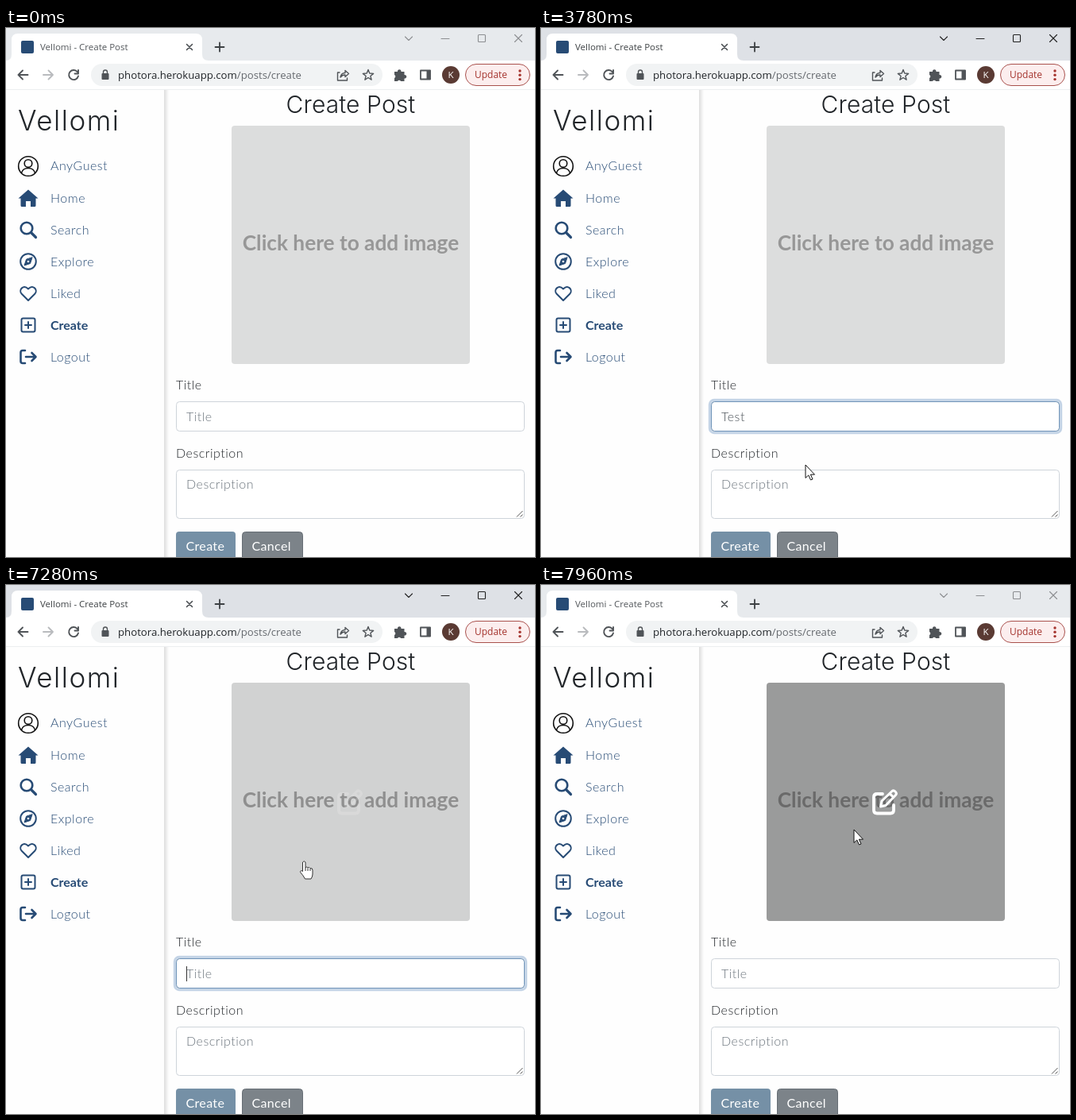
Recreate the animation shown at these times as an HTML page. Size 666 px wide and 666 px high, loop 8 s.

```html
<!DOCTYPE html>
<html lang="en">
<head>
<meta charset="utf-8">
<title>Create Post</title>
<style>
  html, body { margin: 0; width: 100%; height: 100%; overflow: hidden; background: #fefefe; }
  svg { display: block; width: 666px; height: 666px; }
  text { font: 300 16px Lato, sans-serif; letter-spacing: .5px; fill: #212529; white-space: pre; }
  .chrome text { font-family: "Open Sans", "Noto Sans", sans-serif; font-weight: 400; letter-spacing: 0; }
  text.brand { font-family: Inter, sans-serif; letter-spacing: .1px; }
  .nav text { fill: #274b75; }
  text.bold { font-weight: 700; letter-spacing: 0; }
  text.button { font-weight: 400; letter-spacing: .35px; fill: #fff; }
  text.hint { fill: #6c757d; }
  .line { fill: none; stroke-linecap: round; stroke-linejoin: round; }
</style>
</head>
<body>
<svg viewBox="0 0 666 666" xmlns="http://www.w3.org/2000/svg">
  <defs>
    <linearGradient id="shade">
      <stop offset="0" stop-color="#000" stop-opacity=".13"/>
      <stop offset="1" stop-color="#000" stop-opacity="0"/>
    </linearGradient>
  </defs>
  <rect width="666" height="666" fill="#fefefe"/>

  <g class="chrome">
    <rect id="strip" width="666" height="41"/>
    <path d="M0 41Q7 41 7 33V15Q7 7 15 7H239Q247 7 247 15V33Q247 41 255 41V78H0Z" fill="#fff"/>
    <rect y="41" width="666" height="37" fill="#fff"/>
    <rect y="77" width="666" height="1" fill="#eceef0"/>
    <rect x="19" y="16" width="16" height="16" rx="2" fill="#274b75"/>
    <text id="tabTitle" x="43" y="28" style="font-size:11.5px">Vellomi - Create Post</text>
    <path class="line" d="M227.500 20.500l7 7m0-7l-7 7" stroke="#45494d" stroke-width="1.500"/>
    <path class="line" d="M263.500 24H274.500M269 18.500V29.500" stroke="#3c4043" stroke-width="1.800"/>
    <g id="controls" class="line" stroke-width="1.100">
      <path d="M502.500 11l4.500 4.500l4.500-4.500M548 13.500H558M640.500 8.500l9 9m0-9l-9 9"/>
      <rect x="594.500" y="8.500" width="9" height="9" rx="1"/>
    </g>

    <g class="line" stroke="#505458" stroke-width="1.900">
      <path d="M27.500 59H15.500M21 53.500L15.500 59L21 64.500"/>
      <path d="M47 59H59M53.500 53.500L59 59L53.500 64.500" stroke="#b9bbbe"/>
      <path d="M90 55.500A6 6 0 1 0 91 60.500M91 53V57.500H86.500"/>
    </g>
    <rect x="107" y="45" width="367" height="28" rx="14" fill="#f1f3f4"/>
    <rect x="120.500" y="57" width="9" height="8" rx="1" fill="#505458"/>
    <path d="M122.500 57V55.500a2.500 2.500 0 0 1 5 0V57" fill="none" stroke="#505458" stroke-width="1.400"/>
    <text x="141" y="64" style="font-size:13.200px">photora.herokuapp.com<tspan fill="#666a6f">/posts/create</tspan></text>
    <g class="line" stroke="#505458" stroke-width="1.400">
      <path d="M420 56H417.500V66H429.500V63M421 62Q422 56.500 427 56.500V53.500L431.500 57.500L427 61.500V59Q423 59 421 62Z"/>
      <path id="star"/>
      <path d="M522 53.500H534V64.500H522Z" stroke-width="1.800"/>
    </g>
    <rect x="529.500" y="53" width="5" height="12" fill="#505458"/>
    <path d="M489 55h4a2.300 2.300 0 1 1 4.500 0h4v4a2.300 2.300 0 1 1 0 4.500V67h-4.500a2.200 2.200 0 0 0-4 0H489v-4a2.200 2.200 0 0 0 0-4Z" fill="#505458"/>
    <circle cx="560" cy="59" r="11" fill="#5a3a33"/>
    <text x="560" y="63.200" text-anchor="middle" style="font-size:11.500px;fill:#fff">K</text>
    <rect x="578.500" y="45.500" width="81" height="27" rx="13.500" fill="#fceeee" stroke="#a9514d"/>
    <text x="590" y="63" style="font-size:12px;fill:#a5352f">Update</text>
    <g fill="#a5352f"><circle cx="647" cy="54" r="1.700"/><circle cx="647" cy="59.300" r="1.700"/><circle cx="647" cy="64.600" r="1.700"/></g>
  </g>

  <rect x="199" y="78" width="6" height="588" fill="url(#shade)"/>
  <text class="brand" x="15" y="129" style="font-size:35px;letter-spacing:1.500px">Vellomi</text>
  <g class="nav" id="nav"></g>
  <g class="line" stroke="#111" stroke-width="1.600">
    <circle cx="28" cy="174" r="12.300"/>
    <circle cx="28" cy="170.500" r="4.800"/>
    <path d="M19.500 182.500Q21 176.500 28 176.500T36.500 182.500"/>
  </g>
  <path d="M28 203.500L40.500 214.500H37.500V223.500Q37.500 225 36 225H31V218H25V225H20Q18.500 225 18.500 223.500V214.500H15.500Z" fill="#274b75"/>
  <g class="line" stroke="#274b75" stroke-width="2">
    <path d="M31.500 257.500L37.500 263.500" stroke-width="3.200"/>
    <circle cx="26" cy="252" r="7.300" stroke-width="2.600"/>
    <circle cx="28" cy="294" r="9.800"/>
    <path d="M33 289L30.500 296.500L23 299L25.500 291.500Z" fill="#274b75" stroke-width="1"/>
    <circle cx="28" cy="294" r="1.300" fill="#fff" stroke="none"/>
    <path d="M28 343L19.500 334.500C15.500 329.500 22 322.500 28 328.500C34 322.500 40.500 329.500 36.500 334.500Z"/>
    <rect x="19.500" y="365.500" width="17" height="17" rx="2"/>
    <path d="M28 370V378M24 374H32"/>
    <path d="M24 406H21Q18.500 406 18.500 408.500V419.500Q18.500 422 21 422H24M25 414H37M32.500 409L37.500 414L32.500 419" stroke-width="2.600"/>
  </g>

  <text class="brand" x="434" y="107" text-anchor="middle" style="font-size:30px">Create Post</text>
  <rect x="284" y="123" width="300" height="300" rx="4" fill="#dcdddd"/>
  <text class="bold" x="434" y="280" text-anchor="middle" style="font-size:26.250px;fill:#979797">Click here to add image</text>
  <rect id="overlay" x="284" y="123" width="300" height="300" rx="4"/>
  <g id="edit" class="line" stroke="#fff" stroke-width="3.800">
    <path d="M430 263H423Q419 263 419 267V283.500Q419 287.500 423 287.500H440Q444 287.500 444 283.500V277"/>
    <path d="M427.500 279L429 272L442 259.500Q444 258 446 260Q448.500 262.500 446.500 264.500L434 277.500ZM439 262.500L443.500 267" stroke-width="3"/>
  </g>

  <text x="214" y="455">Title</text>
  <rect x="214.500" y="470.500" width="438" height="37" rx="4" fill="#fff" stroke="#ced4da"/>
  <g id="focus" fill="none">
    <rect x="212.400" y="468.400" width="442.200" height="41.200" rx="5.500" stroke="#c4d4e6" stroke-width="3.200"/>
    <rect x="214.500" y="470.500" width="438" height="37" rx="4" stroke="#7094b8"/>
  </g>
  <text id="field" x="227" y="495"></text>
  <rect id="caret" y="480" width="1" height="19" fill="#333"/>

  <text x="214" y="541">Description</text>
  <rect x="214.500" y="556.500" width="438" height="61" rx="4" fill="#fff" stroke="#ced4da"/>
  <text class="hint" x="227" y="580">Description</text>
  <path d="M643 615.500L650.500 608M647.500 615.500L650.500 612.500" stroke="#555" stroke-width="1"/>
  <rect x="214" y="634" width="75" height="38" rx="4" fill="#7590a6"/>
  <rect x="297.500" y="634.500" width="76" height="38" rx="4" fill="#7c8389" stroke="#676e75"/>
  <text class="button" x="226.500" y="658">Create</text>
  <text class="button" x="309.500" y="658">Cancel</text>

  <circle id="click" r="12" fill="#ff0" fill-opacity=".47"/>
  <g id="cursor" stroke-linejoin="round">
    <path id="arrow" d="M0 0V16.500L3.800 13L6.500 19L9 18L6.400 12.200H11.500Z" fill="#fff" stroke="#111"/>
    <path id="beam" d="M-3-7.500H-1L.5-6.500L2-7.500H4M.5-6.500V6.500M-3 7.500H-1L.5 6.500L2 7.500H4" fill="none" stroke="#111" stroke-width="1.200"/>
    <path id="hand" d="M-1.500 1Q.3-1.500 2 1V8Q3.500 6 5 8Q7 6.500 8 8.700Q11 8 11 11V16Q11 19 9 22H1.500Q-.5 18-4.500 13.500Q-4.500 10.500-1.500 12.500ZM2 8V12M5 8.500V12M8 9V12" fill="#fff" stroke="#333"/>
  </g>
</svg>
<script>
const LOOP = 8000;
const $ = id => document.getElementById(id);
const set = (id, attrs) => {
  for (const name in attrs) $(id).setAttribute(name, attrs[name]);
};
const clamp = x => Math.min(1, Math.max(0, x));
const within = (t, spans) => spans.some(([a, b]) => t >= a && t < b);
const easeOut = x => 1 - (1 - x) ** 2;
const smooth = x => x * x * (3 - 2 * x);
const cssEase = x => 1 - (1 - clamp(x)) ** 2.6;

const typed = [
  [0, ''], [2280, 'T'], [2540, 'Te'], [2810, 'Tes'], [3010, 'Test'],
  [6540, 'Tes'], [6670, 'Te'], [6810, 'T'], [7070, '']
];
const caretX = [227, 235.5, 244, 252, 257];
const caretOn = [[1410, 2020], [2280, 3510], [4070, 4730], [5190, 5800], [6270, 7800]];
const clicks = [[1410, 1470], [4400, 4470], [4930, 5000], [7750, 7820]];
const entry = [644, 698];
const moves = [
  { from: 720, until: 1210, steps: 8, to: [375, 498], ease: easeOut },
  { from: 3510, until: 4130, steps: 10, to: [255, 647], ease: smooth },
  { from: 5330, until: 5800, steps: 8, to: [281, 505], ease: smooth },
  { from: 7070, until: 7350, steps: 5, to: [386, 330], ease: smooth },
  { from: 7420, until: 7550, steps: 3, to: [394, 308], ease: easeOut }
];

// The pointer advances in discrete steps, like a screen capture.
function pointerAt(t) {
  let [x, y] = entry;
  for (const { from, until, steps, to, ease } of moves) {
    if (t < from) break;
    const step = Math.floor((t - from) / (until - from) * (steps - 1) + 1e-6) + 1;
    const p = ease(clamp(step / steps));
    x += (to[0] - x) * p;
    y += (to[1] - y) * p;
  }
  return [x, y];
}

function pointerKind(x, y, t) {
  const inside = (left, top, right, bottom) => x >= left && x < right && y >= top && y < bottom;
  if (t >= 7890) return 'arrow';
  if (inside(214, 470, 653, 508) || inside(214, 556, 653, 618)) return 'beam';
  return inside(284, 123, 584, 423) ? 'hand' : 'arrow';
}

function render(t) {
  const active = t >= 1410 && t < 7800;
  set('strip', { fill: active ? '#dee1e6' : '#e7eaed' });
  set('controls', { stroke: active ? '#222' : '#8c8e91' });
  $('tabTitle').style.fill = active ? '#3c4043' : '#53575b';

  set('focus', { opacity: cssEase((t - 1410) / 150) - cssEase((t - 7770) / 150) });
  const hover = cssEase((t - 7260) / 300);
  set('overlay', { opacity: hover * .3 });
  set('edit', { opacity: hover });

  const value = typed.filter(([at]) => t >= at).pop()[1];
  $('field').textContent = value || 'Title';
  $('field').style.fill = value ? '#495057' : '#6c757d';
  set('caret', { x: caretX[value.length], opacity: +within(t, caretOn) });

  const [x, y] = pointerAt(t);
  const kind = pointerKind(x, y, t);
  set('cursor', { transform: `translate(${Math.round(x)} ${Math.round(y)})`, opacity: +(t >= 720) });
  for (const name of ['arrow', 'beam', 'hand']) set(name, { opacity: +(name === kind) });
  set('click', { cx: x, cy: y, opacity: +within(t, clicks) });
}

const items = ['AnyGuest', 'Home', 'Search', 'Explore', 'Liked', 'Create', 'Logout'];
$('nav').innerHTML = items.map((label, i) =>
  `<text x="56" y="${i ? 180 + i * 40 : 179}"${label === 'Create' ? ' class="bold"' : ''}>${label}</text>`).join('');

const starPoints = Array.from({ length: 10 }, (_, i) => {
  const r = i % 2 ? 3 : 7, a = i * Math.PI / 5;
  return `${456 + r * Math.sin(a)} ${59.5 - r * Math.cos(a)}`;
});
set('star', { d: `M${starPoints.join('L')}Z` });

const start = performance.now();
function frame() {
  render((performance.now() - start) % LOOP);
  requestAnimationFrame(frame);
}
frame();
</script>
</body>
</html>
```
